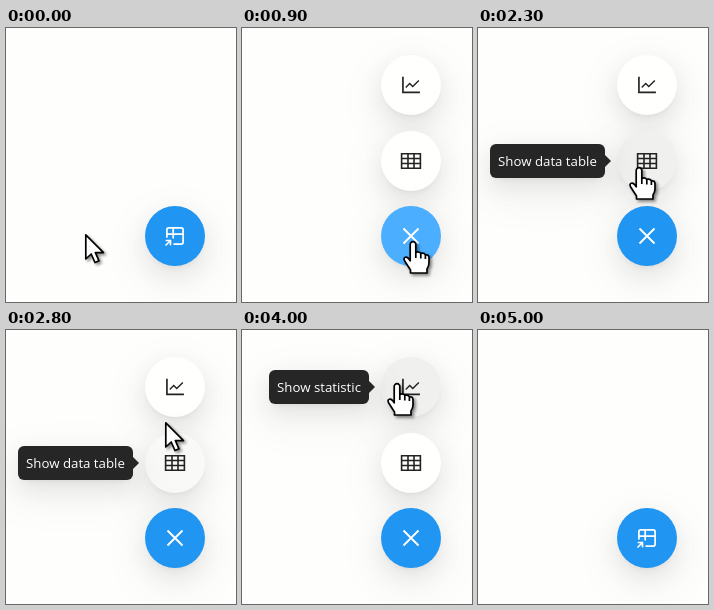
Recreate the animation shown at these times as an HTML page. Size 230 by 274 pixels, loop 5700 ms.

```html
<!DOCTYPE html>
<html lang="en">
<head>
<meta charset="utf-8">
<title>Floating action menu</title>
<style>
  html, body { margin: 0; width: 100%; height: 100%; overflow: hidden; background: #fefefc; }
  #stage { position: relative; width: 230px; height: 274px; overflow: hidden; }
  #menu { position: absolute; inset: 0; }
  .button, .tip {
    position: absolute;
    box-shadow: 0 9px 24px rgba(0, 0, 0, .08), 0 4.5px 9px -6px rgba(0, 0, 0, .12),
                0 13.5px 42px 12px rgba(0, 0, 0, .04);
  }
  .button {
    --hover: 0; --rest: #fffffe; --lit: #f0f0ee;
    left: 139px; width: 60px; height: 60px; border-radius: 50%; color: #222;
    background: color-mix(in srgb, var(--lit) calc(var(--hover) * 100%), var(--rest));
  }
  #chart { top: 27px; }
  #table { top: 103px; }
  #main { top: 178px; color: #fff; --rest: #2095f2; --lit: #4caefe; }
  svg { position: absolute; left: 0; top: 0; overflow: visible; fill: none; stroke: currentColor; }
  .tip {
    right: 103px; height: 34px; padding: 0 8px; box-sizing: border-box; border-radius: 6px;
    background: #262626; color: #fff; white-space: nowrap; transform-origin: calc(100% + 6px) 50%;
    font: 13.25px/34px "Open Sans", "Noto Sans", sans-serif;
  }
  .tip::after {
    content: ""; position: absolute; left: 100%; top: 11px; width: 6px; height: 12px;
    background: inherit; clip-path: polygon(0 0, 100% 50%, 0 100%);
  }
  #tableTip { top: 116px; width: 115px; }
  #chartTip { top: 40px; width: 100px; }
  #cursor { filter: drop-shadow(2px 2px 1.5px rgba(0, 0, 0, .45)); }
  #cursor path { fill: #fff; stroke: #000; stroke-width: 1.7; stroke-linejoin: round; }
</style>
</head>
<body>
<div id="stage">
  <div id="menu">
    <div class="button" id="chart">
      <svg width="60" height="60"><g transform="translate(30 30) scale(.0232) translate(-512 -512)">
        <path stroke-width="72" d="M164 160V828H896"/>
        <path stroke-width="60" d="M286 617 456 450 588 580 850 322"/>
      </g></svg>
    </div>
    <div class="button" id="table">
      <svg width="60" height="60"><g transform="translate(30 30) scale(.0228) translate(-512 -512)">
        <path stroke-width="70" d="M100 196H924V828H100ZM100 400H924M100 624H924M380 196V828M644 196V828"/>
      </g></svg>
    </div>
  </div>
  <div class="button" id="main">
    <svg id="shortcut" width="60" height="60"><g transform="translate(30 30) scale(.9) translate(-12 -12)"
      stroke-width="1.9" stroke-linecap="round" stroke-linejoin="round">
      <path d="M3 13V5a2 2 0 0 1 2-2h14a2 2 0 0 1 2 2v14a2 2 0 0 1-2 2h-8M3 10h18M10 3v11M2 22l5-5M7 21.5V17H2.5"/>
    </g></svg>
    <svg id="close" width="60" height="60"><path stroke-width="1.9" d="M22.5 22.5l15 15M37.5 22.5l-15 15"/></svg>
  </div>
  <div class="tip" id="tableTip">Show data table</div>
  <div class="tip" id="chartTip">Show statistic</div>
  <svg id="cursor" width="1" height="1">
    <path id="arrow" d="M.8.9V25L6.2 20 10 28.5 14 26.8 10.4 18.6H18.5Z"/>
    <path id="hand" d="M-2.8 2.5a2.8 2.8 0 0 1 5.6 0V10.5q2.8-1.6 5 .8 3-1 4.6 1.5 3.4-.5 3.6 2.8V21q0 3-2 6v4H-2.5V28L-8.3 19q-1.6-3 .6-3.8 2-.6 3.6 1.8l1.3 1.8ZM2.8 10.5V16M7.8 11.3V16.5M12.4 12.8V17"/>
  </svg>
</div>
<script>
  const LOOP = 5700, STEP = 100, RADIUS = 30;
  const $ = id => document.getElementById(id);
  const ramp = (t, from, to) => Math.min(1, Math.max(0, (t - from) / (to - from)));
  const smooth = p => p * p * (3 - 2 * p);
  const easeOut = p => 1 - (1 - p) ** 2;
  // Rises at `on`, falls at `off`, each over `length` ms.
  const pulse = (t, on, off, length) => ramp(t, on, on + length) - ramp(t, off, off + length);

  const moves = [ // start, end, x, y
    [50, 650, 171, 214],
    [1250, 1720, 161, 141],
    [2250, 2800, 159, 92],
    [2850, 3200, 155, 57],
    [3970, 4250, 152, -40]
  ];
  const hovers = { main: [400, 1480], table: [1550, 2680], chart: [2930, 4060] };
  const tips = { tableTip: [1730, 2850], chartTip: [3070, 4160] };
  const centers = { main: 208, table: 133, chart: 57 };

  function cursorAt(t) {
    let x = 79, y = 206;
    for (const [start, end, toX, toY] of moves) {
      const p = smooth(ramp(t, start, end));
      x += (toX - x) * p;
      y += (toY - y) * p;
    }
    return [x, y];
  }

  function render(t) {
    const open = t >= 650 && t < 4200;
    const shown = smooth(open ? ramp(t, 620, 880) : 1 - ramp(t, 4180, 4480)) * (t >= 650);
    $("menu").style.opacity = shown;
    $("menu").style.transform = `translateY(${60 * (1 - shown)}px)`;
    $("close").style.display = open ? "" : "none";
    $("shortcut").style.display = open ? "none" : "";

    for (const id in hovers) $(id).style.setProperty("--hover", pulse(t, ...hovers[id], 200));
    for (const id in tips) {
      const p = easeOut(pulse(t, ...tips[id], 100));
      $(id).style.opacity = p;
      $(id).style.transform = `scale(${.8 + .2 * p})`;
    }

    const [x, y] = cursorAt(t);
    const pointing = Object.entries(centers).some(([id, cy]) =>
      (open || id === "main") && Math.hypot(x - 169, y - cy) < RADIUS);
    $("cursor").style.transform = `translate(${Math.round(x)}px, ${Math.round(y)}px)`;
    $("hand").style.display = pointing ? "" : "none";
    $("arrow").style.display = pointing ? "none" : "";
  }

  const began = performance.now();
  function tick() {
    const t = (performance.now() - began) % LOOP;
    render(Math.floor(t / STEP) * STEP);
    requestAnimationFrame(tick);
  }
  tick();
</script>
</body>
</html>
```
